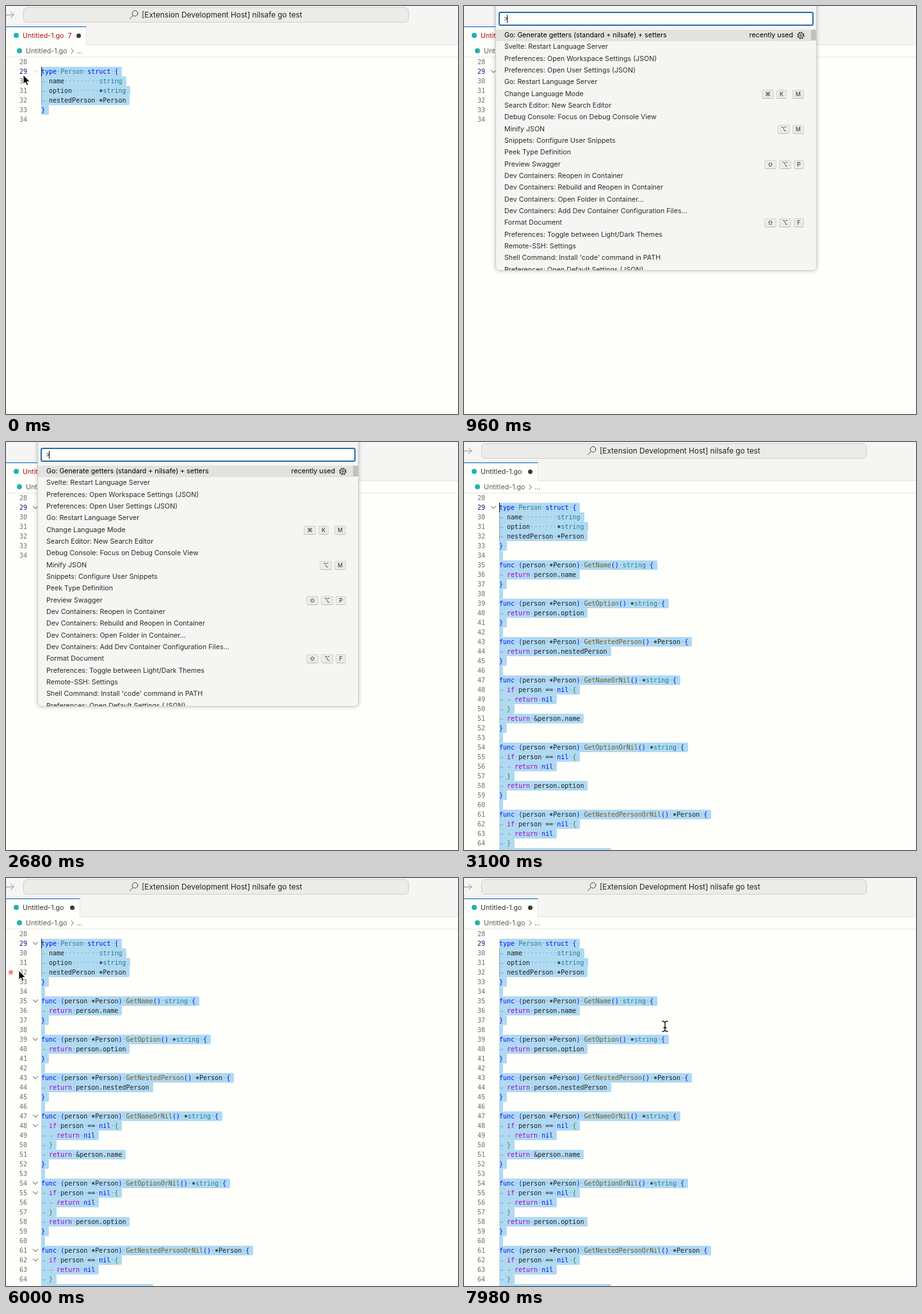
An HTML page that plays this animation: 706x638 px, repeating every 8000 ms.

```html
<!DOCTYPE html>
<html lang="en">
<head>
<meta charset="utf-8">
<title>Generate getters</title>
<style>
  :root { --paper: #fefefb; --bar: #f5f5f3; --line: #e3e3df; --ink: #33332f; }
  html, body { margin: 0; width: 100%; height: 100%; overflow: hidden; background: var(--paper); }
  #stage { position: relative; width: 706px; height: 638px; overflow: hidden; background: var(--paper);
    font: 10.7px Inter, sans-serif; color: var(--ink); }
  #stage div, svg { position: absolute; box-sizing: border-box; white-space: pre; }
  svg { left: 0; top: 0; overflow: visible; fill: none; stroke-linecap: round; }

  /* Hard switches: the palette opens at 500 ms, code arrives at 2800 ms. */
  .before, .after, .idle, .palette, .arrow, .beam, .dot { animation: 8s step-end infinite; }
  .before { animation-name: before; }
  .after { animation-name: after; }
  .idle { animation-name: idle; }
  .palette { animation-name: palette; }
  @keyframes before { 0% { visibility: visible } 35%, 100% { visibility: hidden } }
  @keyframes after { 0% { visibility: hidden } 35%, 100% { visibility: visible } }
  @keyframes idle { 0% { visibility: visible } 6.25% { visibility: hidden } 35%, 100% { visibility: visible } }
  @keyframes palette { 0% { visibility: hidden } 6.25% { visibility: visible } 35%, 100% { visibility: hidden } }

  .titlebar { left: 0; top: 0; width: 706px; height: 61px; background: var(--bar); border-bottom: 1px solid var(--line); }
  .search { left: 27px; top: 2px; width: 602px; height: 24px; border: 1px solid #cfcfca; border-radius: 6px; background: #ebebe8; }
  .title { left: 212px; top: 6px; font-size: 11.8px; line-height: 16px; color: #222; }
  .tab { left: 0; top: 32px; height: 29px; background: var(--paper); border-top: 1px solid #005fb8; border-right: 1px solid var(--line); }
  .tab span { position: absolute; left: 26px; top: 6px; line-height: 15px; }
  .tab i { position: absolute; right: 8px; top: 10px; width: 7px; height: 7px; border-radius: 50%; background: #3b3b36; }
  .wrong { color: #b01011; }
  .logo { width: 8px; height: 8px; border-radius: 50%; background: #22b3b0; }
  .crumb { left: 31px; top: 63px; line-height: 15px; color: #5c5c58; }
  .edge { left: 0; top: 79px; width: 706px; height: 3px; background: linear-gradient(#ececea, var(--paper)); }

  .row { left: 0; width: 706px; height: 15px; font: 10px/15px "DejaVu Sans Mono", monospace; }
  .num { left: 0; width: 33px; text-align: right; color: #6b7075; }
  .num.active { color: #171184; }
  .code { left: 55px; height: 15px; padding-right: 6px; border-radius: 0 2px 2px 0; background: #b0d9f2; color: #202020; }
  .code b { font-weight: normal; }
  .ws { color: #86a9b8; }
  .tabstop { display: inline-block; width: 12px; color: #86a9b8; }
  .code .star { position: relative; top: 2px; font-weight: bold; }
  .kw { color: #0010f8; } .ctl { color: #a800cc; } .type { color: #267f90; } .fn { color: #755c24; } .in { color: #319331; }
  .guide { left: 55px; top: 110px; width: 1px; height: 45px; background: #8ba6b0; }
  .caret { width: 1px; background: #000; animation: blink 1s step-end infinite; }
  @keyframes blink { 0% { opacity: 1 } 50%, 100% { opacity: 0 } }

  .fold { left: 42px; top: 5px; stroke: #4a4a47; animation: fold 8s linear infinite; }
  .fold.first { animation-name: firstFold; }
  @keyframes firstFold { 0% { opacity: .25 } 4%, 80% { opacity: 1 } 86%, 100% { opacity: 0 } }
  @keyframes fold { 0%, 43.7% { opacity: 0 } 43.8%, 80% { opacity: 1 } 86%, 100% { opacity: 0 } }

  .dot { left: 4px; width: 7px; height: 7px; border-radius: 50%; background: #f58a7c; animation-name: dot; }
  @keyframes dot {
    0% { visibility: hidden; top: 99px } 56.25% { visibility: visible; top: 99px }
    67% { visibility: visible; top: 114px } 69.4% { visibility: visible; top: 129px }
    71.7% { visibility: visible; top: 144px } 77%, 100% { visibility: hidden; top: 144px }
  }
  .mouse { left: 0; top: 0; animation: travel 8s ease-in-out infinite; }
  @keyframes travel {
    0%, 56.25% { transform: translate(27px, 108px) }
    61%, 66.25% { transform: translate(23.5px, 105px) }
    72.5%, 76.25% { transform: translate(20px, 145px) }
    81.25%, 100% { transform: translate(314px, 232px) }
  }
  .arrow { animation-name: arrow; }
  .beam { animation-name: beam; }
  @keyframes arrow { 0% { visibility: visible } 6.25% { visibility: hidden } 56.25% { visibility: visible } 77%, 100% { visibility: hidden } }
  @keyframes beam { 0% { visibility: hidden } 77%, 100% { visibility: visible } }

  .palette { left: 49px; top: -6px; width: 502px; height: 420px; border: 1px solid #cdcdc9; border-radius: 6px;
    background: var(--bar); box-shadow: 0 0 6px rgba(0, 0, 0, .24); }
  .input { left: 4px; top: 14px; width: 492px; height: 22px; border: 2px solid #2a6cae; border-radius: 3px; background: var(--paper);
    padding-left: 6px; line-height: 18px; }
  .list { left: 0; top: 42px; width: 500px; height: 376px; overflow: hidden; }
  .item { left: 0; width: 492px; height: 18.33px; padding-left: 13px; font-size: 10.66px; line-height: 18.33px; color: #2b2b29; }
  .item.on { background: #e2e2df; color: #000; }
  .recent { right: 28px; top: 0; }
  .keys { right: 11px; top: 2px; display: flex; gap: 4px; }
  .keys kbd { box-sizing: border-box; min-width: 16px; height: 14px; padding: 0 4px; text-align: center;
    font: 8.8px/12px Inter, "DejaVu Sans", sans-serif; background: #ebebe8; border: 1px solid #d3d3cf; border-bottom-color: #bbbbb7; border-radius: 3px; }
  .thumb { right: 0; top: 0; width: 8px; height: 17px; background: #c0c0bd; }
</style>
</head>
<body>
<div id="stage">
  <div class="titlebar"></div>
  <div class="idle" style="left:0;top:0">
    <svg width="1" height="1" stroke="#8a8a86"><path d="M0 14H12M7.5 9.5 12 14 7.5 18.5"/></svg>
    <div class="search"></div>
    <svg width="1" height="1" stroke="#444"><circle cx="201.5" cy="11.5" r="4.3"/><path d="M198.3 14.6 193.5 20"/></svg>
    <div class="title">[Extension Development Host] nilsafe go test</div>
  </div>
  <div class="tab before" style="width:126px"><span class="wrong">Untitled-1.go  7</span><i></i></div>
  <div class="tab after" style="width:116px"><span>Untitled-1.go</span><i></i></div>
  <div class="logo" style="left:12px;top:42px"></div>
  <div class="logo" style="left:17px;top:66px"></div>
  <div class="crumb">Untitled-1.go</div>
  <svg style="left:102px;top:67px" width="4" height="7" stroke="#5c5c58"><path d="M0 0 3.5 3.5 0 7"/></svg>
  <div class="crumb" style="left:110px">...</div>
  <div class="edge"></div>

  <div id="editor" style="left:0;top:0"></div>
  <div class="guide"></div>
  <svg style="left:62px;top:85px" width="1" height="1" fill="#dcae08"><circle r="4"/><path d="M-2.2 2h4.4v4.5h-4.4z"/></svg>
  <div class="caret" style="left:55px;top:95px;height:15px;animation-delay:-10ms"></div>
  <div class="dot"></div>

  <div class="mouse">
    <svg class="arrow" width="1" height="1"><path d="M0 0V14L3.3 11 5.6 16.3 8 15.3 5.7 10.3H10.2Z" fill="#000" stroke="#fff"/></svg>
    <svg class="beam" width="1" height="1"><path d="M-4-8Q0-8 0-5Q0-8 4-8M0-5V5M-4 8Q0 8 0 5Q0 8 4 8M-2 2H2" stroke="#000" stroke-width="1.3"/></svg>
  </div>

  <div class="palette">
    <div class="input">&gt;<div class="caret" style="left:11px;top:3px;height:12px;animation-delay:-500ms"></div></div>
    <div class="list" id="list"></div>
  </div>
</div>
<script>
  const FIRST_LINE = 28, LINE_HEIGHT = 15, ITEM_HEIGHT = 18.33;

  const fields = [['Name', 'name', 'string'], ['Option', 'option', '*string'], ['NestedPerson', 'nestedPerson', '*Person']];
  const getter = ([name, field, type]) =>
    [`func (person *Person) Get${name}() ${type} {`, `\treturn person.${field}`, '}', ''];
  const safeGetter = ([name, field, type]) => {
    const ref = type[0] === '*' ? '' : '&';
    return [`func (person *Person) Get${name}OrNil() *${type.replace('*', '')} {`,
      '\tif person == nil {', '\t\treturn nil', '\t}', `\treturn ${ref}person.${field}`, '}', ''];
  };
  const lines = ['', 'type Person struct {', '\tname         string', '\toption       *string',
    '\tnestedPerson *Person', '}', '', ...fields.flatMap(getter), ...fields.flatMap(safeGetter)].slice(0, 38);

  function tokenClass(token, line) {
    if (/^(type|struct|func|nil)$/.test(token)) return 'kw';
    if (/^(return|if)$/.test(token)) return 'ctl';
    if (token === 'string' || token === 'Person' && line.startsWith('type')) return 'type';
    if (/^Get/.test(token)) return 'fn';
    if (/[{}]/.test(token) && line[0] === '\t') return 'in';
    if (/[(){}]/.test(token)) return 'kw';
    return token === '*' ? 'star' : '';
  }

  const paint = line => line.replace(/\w+|\s|[^\w\s]/g, token => {
    if (token === '\t') return '<span class="tabstop">→</span>';
    if (token === ' ') return '<span class="ws">·</span>';
    return `<b class="${tokenClass(token, line)}">${token === '&' ? '&amp;' : token}</b>`;
  });

  document.getElementById('editor').innerHTML = lines.map((line, i) => {
    const number = FIRST_LINE + i, active = number === 29;
    const fold = line.endsWith('{')
      ? `<svg class="fold ${active ? 'first' : ''}" width="8" height="5"><path d="M.5.5 4 4.2 7.5.5"/></svg>` : '';
    const code = i ? `<div class="code ${number > 33 ? 'after' : ''}">${paint(line)}</div>` : '';
    return `<div class="row ${number > 34 ? 'after' : ''}" style="top:${80 + i * LINE_HEIGHT}px">` +
      `<div class="num ${active ? 'active' : ''}">${number}</div>${fold}${code}</div>`;
  }).join('');

  const commands = `Go: Generate getters (standard + nilsafe) + setters
Svelte: Restart Language Server
Preferences: Open Workspace Settings (JSON)
Preferences: Open User Settings (JSON)
Go: Restart Language Server
Change Language Mode|⌘ K M
Search Editor: New Search Editor
Debug Console: Focus on Debug Console View
Minify JSON|⌥ M
Snippets: Configure User Snippets
Peek Type Definition
Preview Swagger|⇧ ⌥ P
Dev Containers: Reopen in Container
Dev Containers: Rebuild and Reopen in Container
Dev Containers: Open Folder in Container...
Dev Containers: Add Dev Container Configuration Files...
Format Document|⇧ ⌥ F
Preferences: Toggle between Light/Dark Themes
Remote-SSH: Settings
Shell Command: Install 'code' command in PATH
Preferences: Open Default Settings (JSON)`.split('\n');

  const gear = '<svg style="left:475.5px;top:9px" width="1" height="1" stroke="#2e2e2b">' +
    '<circle r="4"/><circle r="1.5"/><circle r="5" stroke-width="1.6" stroke-linecap="butt" stroke-dasharray="1.96 1.96"/></svg>';
  const keycaps = keys => `<div class="keys">${keys.split(' ').map((key, i, all) =>
    `<kbd${all[0] === '⌘' && i === 2 ? ' style="margin-left:5px"' : ''}>${key}</kbd>`).join('')}</div>`;

  document.getElementById('list').innerHTML = commands.map((command, i) => {
    const [label, keys] = command.split('|');
    const extra = i ? (keys ? keycaps(keys) : '') : `<div class="recent">recently used</div>${gear}`;
    return `<div class="item ${i ? '' : 'on'}" style="top:${i * ITEM_HEIGHT}px">${label}${extra}</div>`;
  }).join('') + '<div class="thumb"></div>';
</script>
</body>
</html>
```
